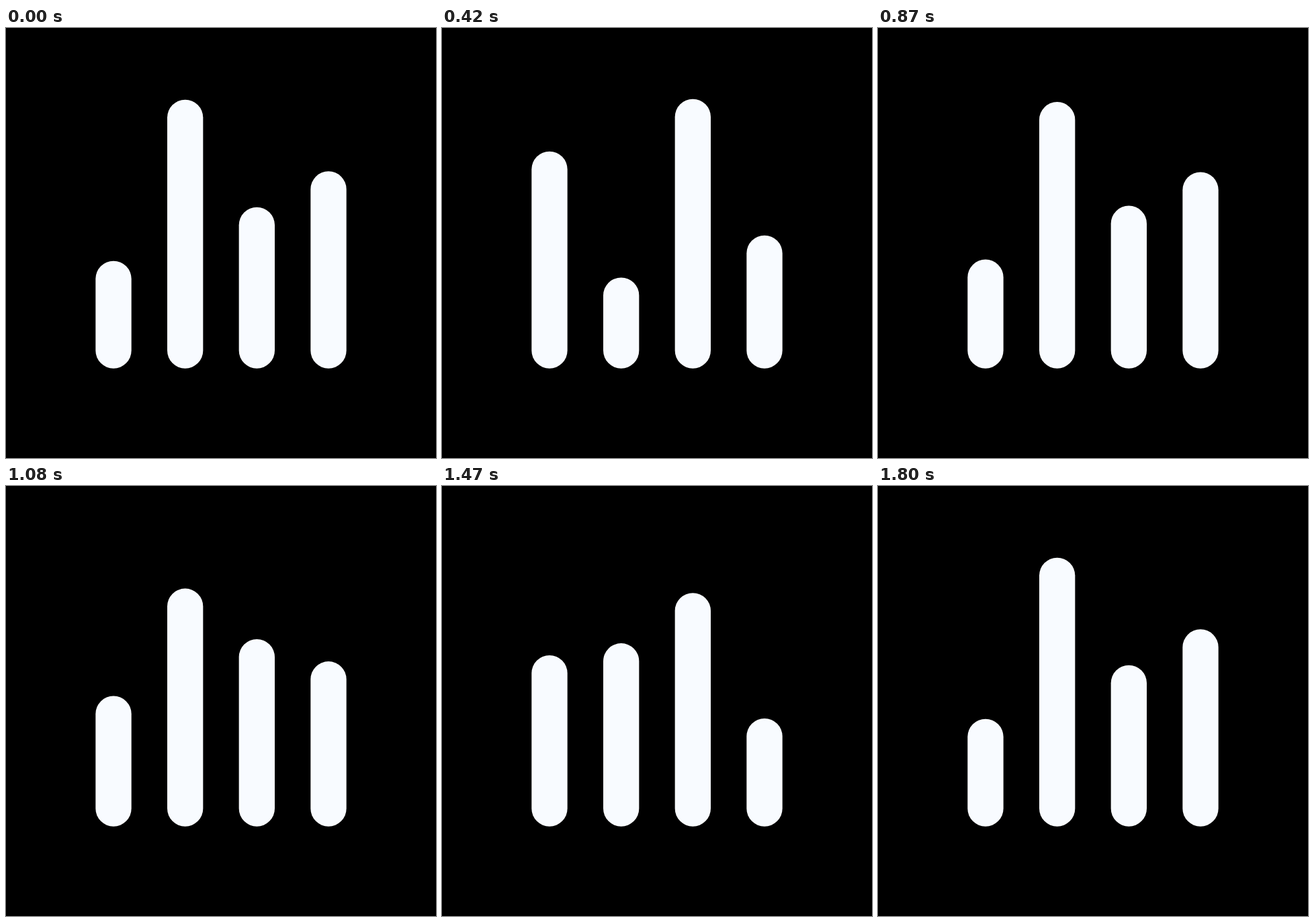
Recreate the animation shown at these times as an HTML page. Size 640 by 640 pixels, loop 1.83 s.

```html
<!DOCTYPE html>
<html lang="en">
<head>
<meta charset="utf-8">
<title>Equalizer bars</title>
<style>
  html, body { margin: 0; width: 100%; height: 100%; overflow: hidden; background: #000; }
  svg { display: block; width: 100%; height: 100%; }
</style>
</head>
<body>
<svg viewBox="0 0 640 640" fill="#f8fbff"></svg>
<script>
const STEP = 30, STEPS = 61, BASE = 1520 / 3, WIDTH = 160 / 3;

// Bar tops for the three poses
const rest = [346.67, 106.67, 266.67, 213.33];
const first = [181.7, 374.8, 103.6, 310];
const second = [211.6, 288.6, 113.2, 402.6];

const smooth = [1 / 3, 0, 2 / 3, 1];
const segments = [
  { from: rest, to: first, ease: smooth },
  { from: first, to: rest, ease: smooth },
  { from: rest, to: second, ease: [1 / 3, 0, 5 / 6, 5 / 6] },
  { from: second, to: rest, ease: [1 / 6, 1 / 6, 5 / 6, 1] }
];

const svg = document.querySelector("svg");
const bars = rest.map((_, i) => {
  const bar = document.createElementNS("http://www.w3.org/2000/svg", "rect");
  bar.setAttribute("x", 400 / 3 + i * 320 / 3);
  bar.setAttribute("width", WIDTH);
  bar.setAttribute("rx", WIDTH / 2);
  return svg.appendChild(bar);
});

function bezier([x1, y1, x2, y2], x) {
  const at = (a, b, t) => 3 * (1 - t) ** 2 * t * a + 3 * (1 - t) * t * t * b + t ** 3;
  let lo = 0, hi = 1;
  for (let i = 0; i < 30; i++) {
    const mid = (lo + hi) / 2;
    if (at(x1, x2, mid) < x) lo = mid; else hi = mid;
  }
  return at(y1, y2, (lo + hi) / 2);
}

function draw(ms) {
  const pos = Math.floor(ms / STEP) % STEPS / 15;
  const index = Math.min(3, Math.floor(pos));
  const { from, to, ease } = segments[index];
  const k = bezier(ease, pos - index);
  bars.forEach((bar, i) => {
    const top = from[i] + (to[i] - from[i]) * k;
    bar.setAttribute("y", top);
    bar.setAttribute("height", BASE - top);
  });
}

const start = performance.now();
function tick() {
  draw(performance.now() - start);
  requestAnimationFrame(tick);
}
tick();
</script>
</body>
</html>
```
